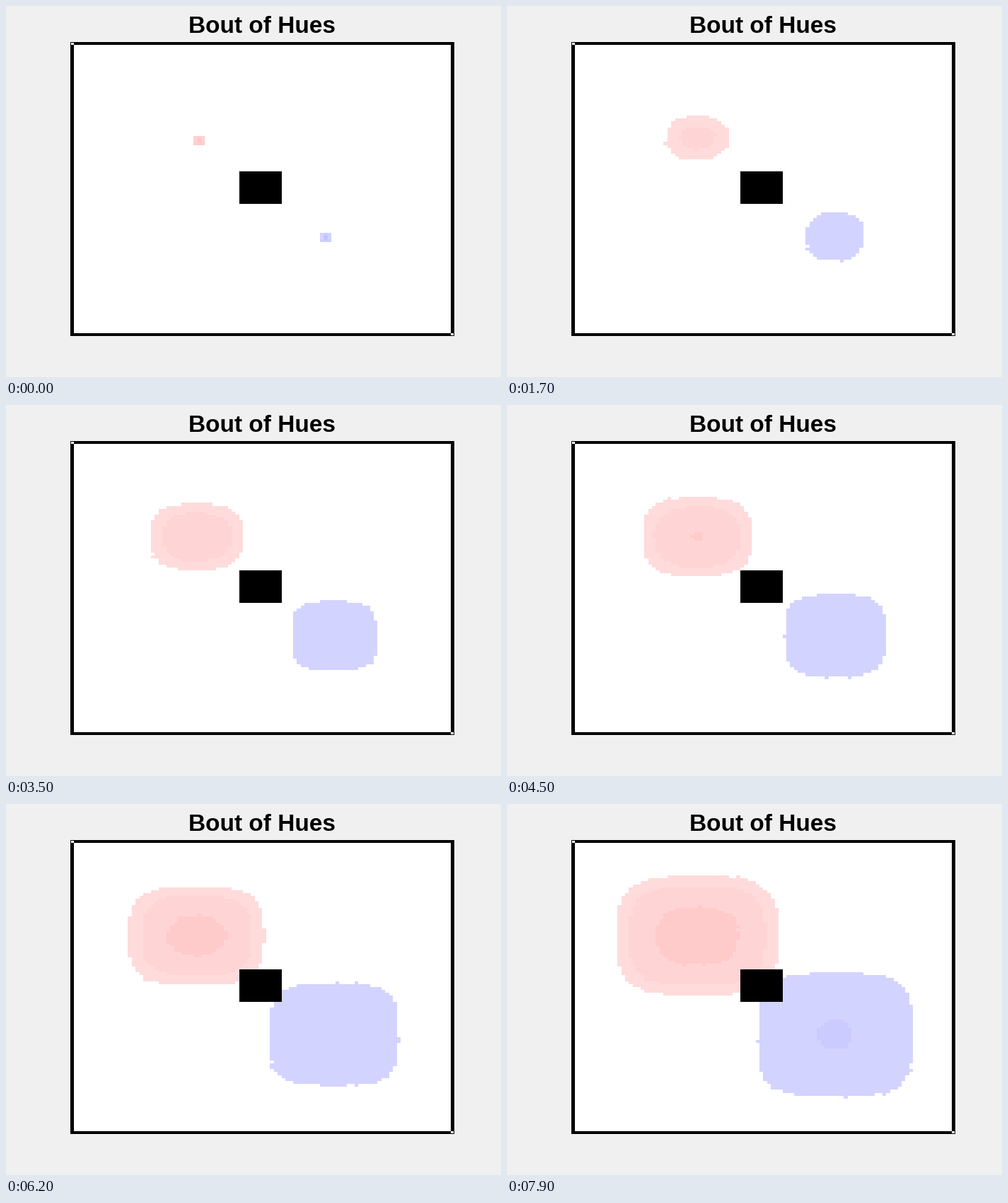
A matplotlib script that plays this animation: 700 by 525 pixels, repeating every 8 s.

```python
import numpy as np
import matplotlib.pyplot as plt
from matplotlib.animation import FuncAnimation

W, H, DPI = 700, 525, 100
N, FRAMES, STEP = 100, 80, 100
LEFT, RIGHT, TOP, BOTTOM = 91, 633, 51, 466

rng = np.random.default_rng(7)
# A few cells join the blob ahead of their neighbours
EAGER = np.where(rng.random((N, N)) < 0.06, 0.5, 0)
TINTS = rng.integers(195, 215, (3, 3))


def to_cells(first, last, origin, size):
    """Board cell under each pixel from first to last."""
    pixels = np.arange(first, last + 1) + 0.5
    return ((pixels - origin) / size).astype(int).clip(0, N - 1)


COLS = to_cells(LEFT, RIGHT, 90.97, 5.43)
ROWS = to_cells(TOP, BOTTOM, 51.2, 4.155)
cx, cy = np.meshgrid(np.arange(N) + 0.5, np.arange(N) + 0.5)


class Blob:
    def __init__(self, center, size, corner, seed, tone):
        self.center, self.size = center, size
        self.corner, self.seed, self.tone = corner, seed, tone

    def reach(self, age):
        """Cells covered at a given age: fast burst, then steady growth."""
        burst = 1 - np.exp(-age / 3)
        a, b = (1.5 + (s - 1.5) * burst + 0.205 * age for s in self.size)
        p = max(2, self.corner - 3 * np.exp(-age / 20))
        dx, dy = abs(cx - self.center[0]) / a, abs(cy - self.center[1]) / b
        radius = (dx ** p + dy ** p) ** (1 / p)
        return (radius - 1) * a <= EAGER

    def paint(self, grid, age, level):
        if age >= 0:
            grid[self.reach(age)] = self.tone(level)

    def plant(self, grid):
        for (r, c), v in np.ndenumerate(TINTS):
            grid[self.seed + r, self.seed + c] = self.tone(v)


RED = Blob((32.9, 32.6), (4.9, 4.1), 3.4, 32, lambda v: (255, v, v))
BLUE = Blob((68.7, 66.2), (3.9, 4.6), 3.9, 65, lambda v: (v, v, 255))


def board(t):
    grid = np.full((N, N, 3), 255, np.uint8)
    if t == 0:
        RED.plant(grid)
        BLUE.plant(grid)
    else:
        RED.paint(grid, t, 219)
        BLUE.paint(grid, t, 211)
    # Denser cores follow the outer edge
    RED.paint(grid, 0.95 * (t - 13.5), 212)
    RED.paint(grid, 0.82 * (t - 45), 202)
    BLUE.paint(grid, t - 74, 203)
    # Walls with two open corners, and the center block
    grid[[0, -1]] = grid[:, [0, -1]] = 0
    grid[0, 0] = grid[-1, -1] = 255
    grid[44:55, 44:55] = 0
    return grid


def stage(t):
    img = np.full((H, W, 3), 240, np.uint8)
    area = board(t)[ROWS][:, COLS]
    area[[0, -1]] = area[:, [0, -1]] = 0
    img[TOP:BOTTOM + 1, LEFT:RIGHT + 1] = area
    return img


fig = plt.figure(figsize=(W / DPI, H / DPI), dpi=DPI)
ax = fig.add_axes([0, 0, 1, 1])
ax.axis("off")
picture = ax.imshow(stage(0), extent=(0, W, H, 0), aspect="auto",
                    interpolation="nearest")
ax.text(362, 38, "Bout of Hues", family="Liberation Sans", weight="bold",
        size=24, ha="center", va="baseline", color="black")


def update(t):
    picture.set_data(stage(t))
    return (picture,)


anim = FuncAnimation(fig, update, frames=FRAMES, interval=STEP,
                     repeat=True, repeat_delay=0, blit=False)
plt.show()
```
